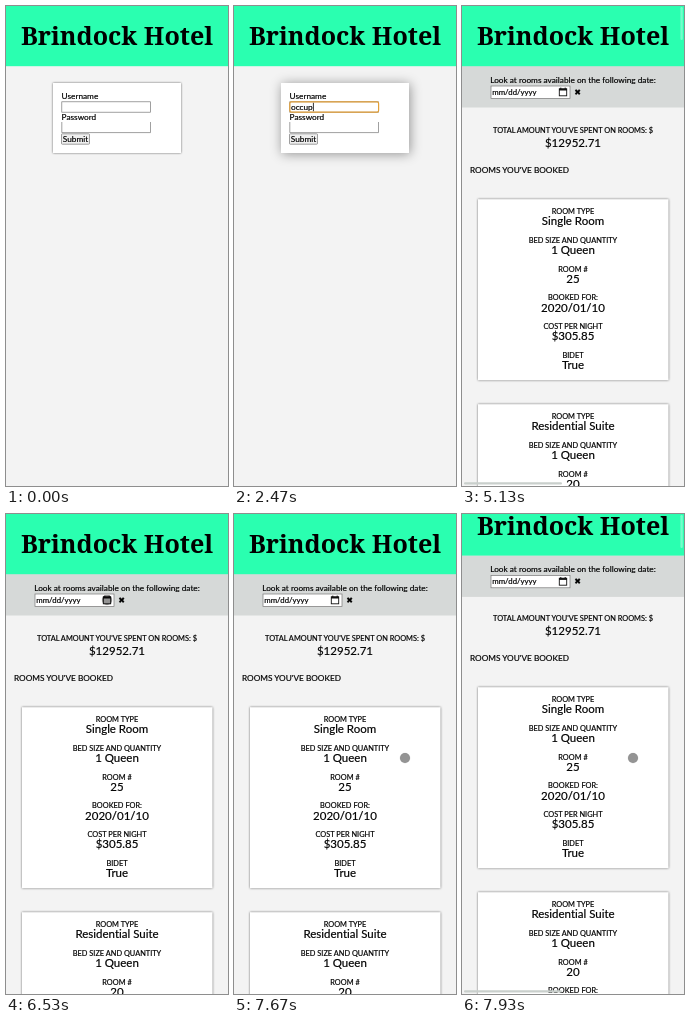
An HTML page that plays this animation: 222x480 px, repeating every 8000 ms.

```html
<!DOCTYPE html>
<html lang="en">
<head>
<meta charset="utf-8">
<title>Hotel booking</title>
<style>
  html, body { margin: 0; height: 100%; overflow: hidden; background: #f3f3f3; }
  svg { display: block; width: 222px; height: 480px; font: 8.25px Lato, sans-serif; }
  text { font-variant-ligatures: none; stroke: #000; stroke-width: .18; }
  .mid { text-anchor: middle; }
  .label { font-size: 7.4px; }
  .value { font-size: 11.5px; }
  .brand { font: bold 25.1px "Noto Serif", serif; stroke: none; }
  .card { fill: #fff; filter: drop-shadow(.5px .5px 1.2px #666); }
  .field { fill: #fff; stroke: #777; stroke-width: .7; }
  .ring { fill: none; stroke: #e3a038; stroke-width: 1.2; }
</style>
</head>
<body>
<svg viewBox="0 0 222 480">
  <rect width="222" height="480" fill="#f3f3f3"/>

  <g id="login">
    <rect id="form" class="card" x="47" y="77" width="128" height="70"/>
    <text x="55.6" y="92.9">Username</text>
    <rect class="field" x="55.8" y="95.8" width="88.7" height="10.4"/>
    <text id="user" x="57" y="104"></text>
    <text x="55.6" y="113.9">Password</text>
    <path class="field" d="M55.8 116V126.6H144.5V116"/>
    <text id="pass" x="57" y="124.6"></text>
    <rect id="ring" class="ring" x="55.8" width="88.8" height="10.4" rx="1.6"/>
    <rect id="caret" width=".8" height="8.4"/>
    <rect class="field" x="55.5" y="127.8" width="28" height="10.4" rx=".8" style="fill:#efefef"/>
    <text class="mid" x="69.5" y="135.7">Submit</text>
  </g>

  <g id="rooms">
    <text class="label mid" x="111" y="126.7">TOTAL AMOUNT YOU'VE SPENT ON ROOMS: $</text>
    <text class="value mid" x="111" y="140.8">$12952.71</text>
    <text x="8" y="167">ROOMS YOU'VE BOOKED</text>
  </g>

  <g id="top">
    <g id="search">
      <rect y="60" width="222" height="41.5" fill="#d6d9d8"/>
      <text class="mid" x="111" y="76.5">Look at rooms available on the following date:</text>
      <rect class="field" x="29" y="80" width="79" height="12.4"/>
      <text x="30.3" y="88.9" style="font-size:7.8px">mm/dd/yyyy</text>
      <g fill="none" stroke="#111">
        <rect x="97.3" y="82.8" width="7.4" height="7" stroke-width=".9"/>
        <path d="M97 83.6H105" stroke-width="1.8"/>
        <path d="M98.8 81.6V83M103.2 81.6V83"/>
      </g>
      <text class="mid" x="115.5" y="89" style="font:8px 'DejaVu Sans',sans-serif">✖</text>
    </g>
    <rect width="222" height="60.2" fill="#2affb0"/>
    <text class="brand mid" x="111" y="39.2">Brindock Hotel</text>
  </g>

  <g id="bars">
    <rect x="218.4" y="1" width="2.4" height="33" rx="1.2" fill="#fff" fill-opacity=".35"/>
    <rect x="2" y="476.3" width="98" height="2.2" rx="1.1" fill="#c9cfcc"/>
  </g>
  <circle id="dot" r="5" fill="#000" fill-opacity=".42" stroke="#000" stroke-opacity=".2" stroke-width=".4"/>
</svg>
<script>
const $ = id => document.getElementById(id);
const clamp = v => Math.min(1, Math.max(0, v));
const show = (id, on) => $(id).style.display = on ? "" : "none";
const place = (id, attrs) => {
  for (const name in attrs) $(id).setAttribute(name, attrs[name]);
};

const LOOP = 8000, STEP = 1000 / 15;
const FOCUS = 1100, TAB = 4195, PASTE = 4660, LOGIN = 5130, SCROLL = 7667;
const NAME = "occupant73";
const KEYS = [1800, 1930, 2130, 2260, 2460, 2860, 3000, 3200, 3860, 4000];
const LABELS = ["ROOM TYPE", "BED SIZE AND QUANTITY", "ROOM #", "BOOKED FOR:", "COST PER NIGHT", "BIDET"];

// pointer paths as [time, x, y]
const TO_FORM = [[60, 200, 446], [467, 165, 290], [867, 95, 150], [1067, 95, 102], [1795, 95, 102]];
const TO_ROOMS = [[6260, 95, 101], [6400, 82, 91], [6533, 101, 86], [6733, 122, 80],
  [7067, 161, 168], [7267, 169, 224], [7467, 171, 244], [LOOP, 171, 244]];

function addCard(top, values) {
  let html = `<rect class="card" x="16" y="${top}" width="190.5" height="181"/>`;
  LABELS.forEach((label, i) => {
    const y = top + 14.9 + i * 28.7;
    html += `<text class="label mid" x="111" y="${y}">${label}</text>
      <text class="value mid" x="111" y="${y + 11.3}">${values[i]}</text>`;
  });
  $("rooms").insertAdjacentHTML("beforeend", html);
}
addCard(193.2, ["Single Room", "1 Queen", "25", "2020/01/10", "$305.85", "True"]);
addCard(398.2, ["Residential Suite", "1 Queen", "20", "2020/01/10", "$305.85", "True"]);

function along(path, t) {
  const i = path.findIndex((p, k) => k && t <= p[0]);
  if (t < path[0][0] || i < 0) return null;
  const [a, b] = [path[i - 1], path[i]], p = (t - a[0]) / (b[0] - a[0]);
  return { cx: a[1] + (b[1] - a[1]) * p, cy: a[2] + (b[2] - a[2]) * p };
}

function drawLogin(t) {
  const hover = clamp((t - 880) / 390), offset = 0.5 + hover;
  $("form").style.filter = `drop-shadow(${offset}px ${offset}px ${1.2 + 4.6 * hover}px
    rgba(0,0,0,${0.6 - 0.2 * hover}))`;

  const typed = KEYS.filter(k => t >= k);
  const inPass = t >= TAB, field = inPass ? "pass" : "user";
  $("user").textContent = NAME.slice(0, typed.length);
  $("pass").textContent = t >= PASTE ? "•".repeat(12) : "";

  const lastKey = t >= PASTE ? PASTE : inPass ? TAB : typed.pop() || FOCUS;
  const focused = t >= FOCUS;
  show("ring", focused);
  show("caret", focused && (t - lastKey) % 930 < 465);
  place("ring", { y: inPass ? 116.6 : 95.8 });
  place("caret", { x: 57.2 + $(field).getComputedTextLength(), y: inPass ? 117.6 : 96.8 });
}

function draw(now) {
  const t = Math.floor((now % LOOP + 4) / STEP) * STEP;
  const loggedIn = t >= LOGIN;
  show("login", !loggedIn);
  show("rooms", loggedIn);
  show("search", loggedIn);
  if (!loggedIn) drawLogin(t);

  // the header trails the list slightly
  const scroll = 20 * clamp((t - SCROLL) / 266) ** 1.5;
  place("rooms", { transform: `translate(0 ${-scroll})` });
  place("top", { transform: `translate(0 ${-scroll * 0.93})` });
  $("bars").style.opacity = !loggedIn ? 0 : t > SCROLL + 5 ? 1 : 1 - clamp((t - 5400) / 267);

  const pos = along(TO_FORM, t) || along(TO_ROOMS, t);
  show("dot", pos);
  if (pos) place("dot", pos);
}

const start = performance.now();
function tick() {
  draw(performance.now() - start);
  requestAnimationFrame(tick);
}
tick();
</script>
</body>
</html>
```
